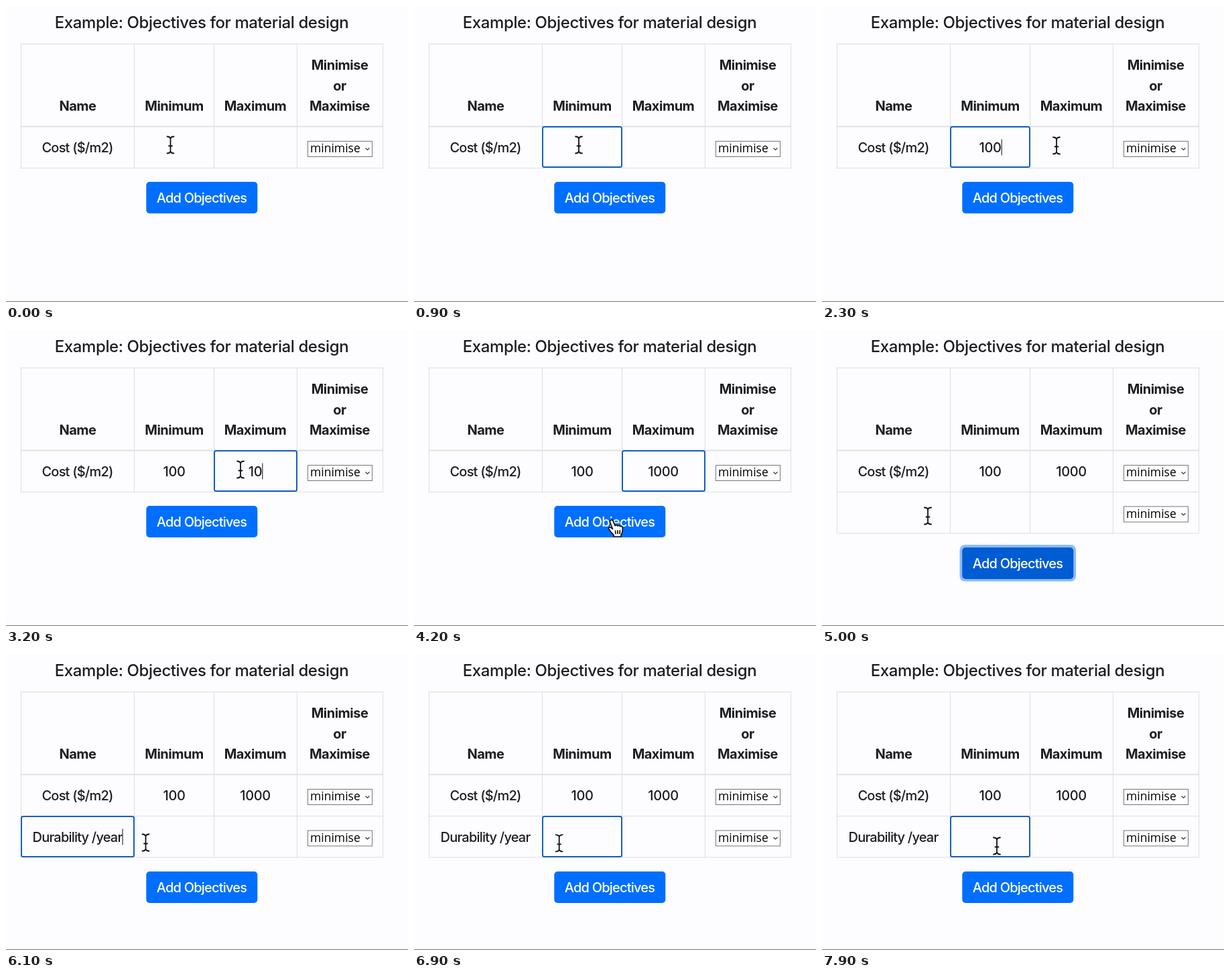
An HTML page that plays this animation: 600 px wide and 441 px high, repeating every 8000 ms.

```html
<!DOCTYPE html>
<html lang="en">
<head>
<meta charset="utf-8">
<title>Objectives table</title>
<style>
  html, body { margin: 0; width: 100%; height: 100%; overflow: hidden; background: #fdfcff; }
  svg { display: block; width: 100vw; height: 100vh; }
  text { font-family: Inter, "Liberation Sans", sans-serif; font-size: 20px; font-weight: 450; letter-spacing: -0.8px; fill: #1b1e22; text-anchor: middle; }
  .title { font-size: 24px; font-weight: 540; letter-spacing: -0.4px; }
  .head { font-weight: 700; letter-spacing: -0.5px; }
  .digits { letter-spacing: -0.4px; }
  .add { fill: #fff; }
  .option { font-family: "Open Sans", "Noto Sans", sans-serif; font-size: 17.5px; font-weight: 500; letter-spacing: 0; fill: #000; text-anchor: start; }
  .line { fill: #dbdfe3; }
  .focus { fill: none; stroke: #1560bf; stroke-width: 2; }
  .caret { fill: #333; }
  .halo { fill: none; stroke: #fff; stroke-width: 4; stroke-linecap: round; }
  .stem { fill: none; stroke: #111; stroke-width: 1.8; stroke-linecap: round; }
</style>
</head>
<body>
<svg viewBox="0 0 600 441">
  <defs>
    <g id="select">
      <rect x="450.5" y="201.5" width="96" height="23" fill="#fff" stroke="#767676"/>
      <text class="option" x="454" y="218">minimise</text>
      <path d="M536.5 211.5l3 3 3-3" fill="none" stroke="#333" stroke-width="1.2"/>
    </g>
    <path id="beam" d="M-5 -12.5Q-0.5 -12.5 0 -9Q0.5 -12.5 5 -12.5M0 -9V9M-5 12.5Q-0.5 12.5 0 9Q0.5 12.5 5 12.5M-2.5 1.5H2.5"/>
  </defs>
  <rect width="600" height="441" fill="#fdfcff"/>
  <rect y="440" width="600" height="1" fill="#777"/>
  <text class="title" x="292" y="33">Example: Objectives for material design</text>
  <g id="grid"></g>
  <g id="heads"></g>
  <text x="106.5" y="218">Cost ($/m2)</text>
  <use href="#select"/>
  <g id="row2">
    <g id="grid2"></g>
    <use href="#select" y="61.5"/>
  </g>
  <text id="min" class="digits" x="251" y="218"></text>
  <text id="max" class="digits" x="372" y="218"></text>
  <text id="name" x="106.5" y="280"></text>
  <g id="button">
    <rect id="ring" x="205.5" y="258" width="173.5" height="54.5" rx="8" fill="#8abaff"/>
    <rect id="face" x="209.3" y="262" width="166" height="47" rx="5"/>
    <text class="add" x="292" y="293.3">Add Objectives</text>
  </g>
  <rect id="focus" class="focus" height="60" rx="2.5"/>
  <rect id="caret" class="caret" width="1.2" height="24"/>
  <g id="ibeam"><use href="#beam" class="halo"/><use href="#beam" class="stem"/></g>
  <path id="hand" fill="#fff" stroke="#111" stroke-width="1.7" stroke-linejoin="round"
    d="M-6.5 -12C-9 -11.5 -9 -9.5 -8 -7.5L-4.5 1.5C-6.5 -1 -9.5 -1.8 -10.5 0C-11.2 1.5 -9 3 -7.5 5.2C-5.8 8 -4 9 -2.8 10.5V13H8V10.3C10 7 10.8 3 10.3 -0.5C9.8 -3 7.5 -3.2 6.7 -2.2C6.2 -4.2 3.8 -4.4 3 -3C2.2 -4.7 -0.2 -5 -1 -3.5L-3.8 -10.2C-4.5 -11.8 -5.5 -12.2 -6.5 -12ZM-0.5 3.5L0 9M3 3.2V9M6.4 3L6 9"/>
</svg>
<script>
  const LOOP = 8000, STEP = 100, ROW = 62;
  const $ = id => document.getElementById(id);
  const show = (el, on) => el.setAttribute("visibility", on ? "visible" : "hidden");
  const set = (el, attrs) => { for (const k in attrs) el.setAttribute(k, attrs[k]); };

  function add(parent, tag, attrs, text = "") {
    const el = document.createElementNS("http://www.w3.org/2000/svg", tag);
    set(el, attrs);
    el.textContent = text;
    parent.append(el);
  }

  const columns = [22, 191, 310, 434, 562];
  const rule = (parent, x, y, width, height) =>
    add(parent, "rect", { class: "line", x, y, width, height });
  for (const x of columns) {
    rule($("grid"), x, 56, 1, 185);
    rule($("grid2"), x, 242, 1, 61);
  }
  rule($("grid"), 22, 56, 541, 1);
  rule($("grid"), 22, 178.6, 541, 1.8);
  rule($("grid"), 22, 241, 541, 1);
  rule($("grid2"), 22, 302.5, 541, 1);

  const heads = [["Name", 107, 156], ["Minimum", 251, 156], ["Maximum", 372, 156],
    ["Minimise", 498, 95], ["or", 498, 126], ["Maximise", 498, 156]];
  for (const [label, x, y] of heads) add($("heads"), "text", { class: "head", x, y }, label);

  const even = (text, from, gap) => [...text].map((_, i) => from + i * gap);
  const fields = [
    { id: "min", text: "100", keys: [1300, 1500, 1900] },
    { id: "max", text: "1000", keys: [3100, 3200, 3300, 3500] },
    { id: "name", text: "Durability /year", keys: even("Durability /year", 5500, 37) }
  ];

  // Focused cells: span in time, column, row, field being typed
  const visits = [
    { from: 300, to: 2700, col: 1, row: 0, field: fields[0] },
    { from: 2700, to: 4400, col: 2, row: 0, field: fields[1] },
    { from: 5300, to: 6400, col: 0, row: 1, field: fields[2] },
    { from: 6400, to: LOOP, col: 1, row: 1 }
  ];

  // Pointer path: time, x, y
  const path = [[0, 245.5, 207], [300, 246, 207], [1700, 246, 207], [2200, 350, 208],
    [3700, 350, 208], [4150, 301, 295], [4600, 301, 295], [5000, 158, 277],
    [5600, 158, 277], [6000, 208.5, 281], [6800, 208.5, 281], [7200, 261, 286], [LOOP, 261, 286]];

  function pointer(t) {
    const i = path.findIndex(p => p[0] > t);
    const [a, b] = [path[i - 1], path[i]];
    const u = (t - a[0]) / (b[0] - a[0]);
    const k = u * u * (3 - 2 * u);
    return [a[1] + (b[1] - a[1]) * k, a[2] + (b[2] - a[2]) * k];
  }

  function drawFocus(t) {
    const visit = visits.find(v => t >= v.from && t < v.to);
    show($("focus"), visit);
    show($("caret"), false);
    if (!visit) return;
    const { col, row, field, from } = visit;
    const left = columns[col] + 1;
    set($("focus"), { x: left, y: 180 + row * ROW, width: columns[col + 1] - left });

    const last = field ? field.keys.filter(k => k <= t).pop() : 0;
    const lit = Math.floor((t - (last || from)) / 500) % 2 === 0;
    const center = [106.5, 251.2, 372][col];
    const half = last ? $(field.id).getComputedTextLength() / 2 : 0;
    set($("caret"), { x: center + half, y: 198.5 + row * ROW });
    show($("caret"), lit);
  }

  function draw(t) {
    for (const { id, text, keys } of fields)
      $(id).textContent = text.slice(0, keys.filter(k => k <= t).length);

    const added = t >= 4400;
    show($("row2"), added);
    set($("button"), { transform: `translate(0 ${added ? ROW : 0})` });
    show($("ring"), added && t < 5400);
    set($("face"), { fill: t >= 4300 && t < 5400 ? "#005cd3" : "#006fff" });

    drawFocus(t);

    const [x, y] = pointer(t);
    const pointing = t >= 4000 && t < 4700;
    for (const id of ["ibeam", "hand"]) set($(id), { transform: `translate(${x} ${y})` });
    show($("ibeam"), !pointing);
    show($("hand"), pointing);
  }

  function tick(now) {
    const t = now % LOOP;
    draw(t - t % STEP);
    requestAnimationFrame(tick);
  }
  draw(0);
  requestAnimationFrame(tick);
</script>
</body>
</html>
```
